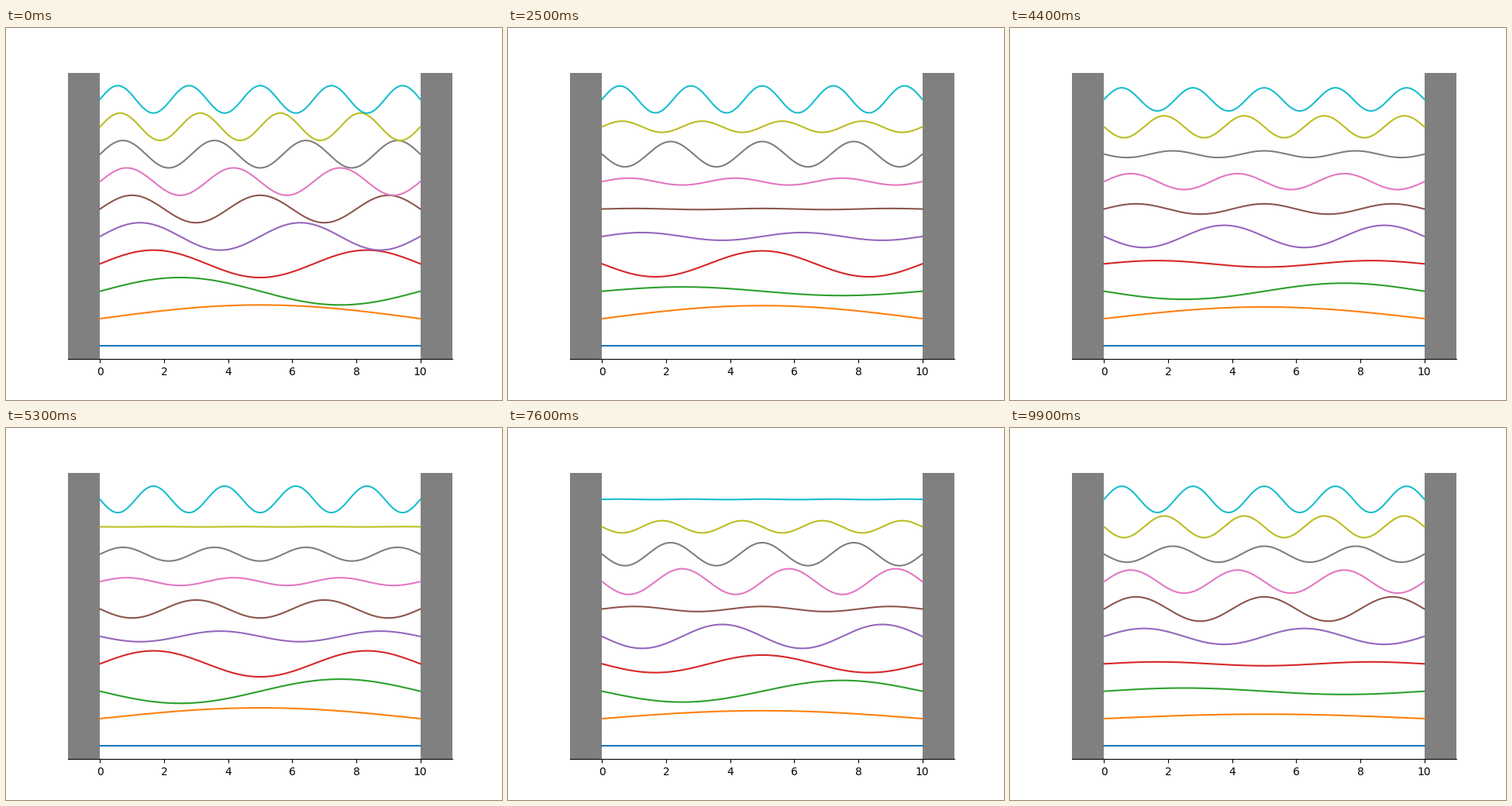
A matplotlib script for the animation above (10000 ms loop, 640 by 480 pixels).

```python
import numpy as np
import matplotlib.pyplot as plt
from matplotlib.animation import FuncAnimation

LENGTH = 10
MODES = 10
FRAMES = 100
BASE_RATE = 0.0125  # phase per frame of the first mode; grows with n squared

x = np.linspace(0, LENGTH, 300)
shapes = [np.sin(n * np.pi * x / LENGTH) for n in range(MODES)]

fig, ax = plt.subplots(figsize=(6.4, 4.8), dpi=100)
ax.set_xlim(-1, LENGTH + 1)
ax.set_ylim(-0.95, 19.95)
ax.set_yticks([])
ax.spines[["left", "right", "top"]].set_visible(False)

for left, right in ((-1, 0), (LENGTH, LENGTH + 1)):
    ax.axvspan(left, right, facecolor="gray", linewidth=0)

lines = [ax.plot(x, 2 * n + shape)[0] for n, shape in enumerate(shapes)]


def update(frame):
    for n, (line, shape) in enumerate(zip(lines, shapes)):
        line.set_ydata(2 * n + shape * np.cos(BASE_RATE * n**2 * frame))
    return lines


anim = FuncAnimation(fig, update, frames=FRAMES, interval=100, repeat=True)
plt.show()
```
